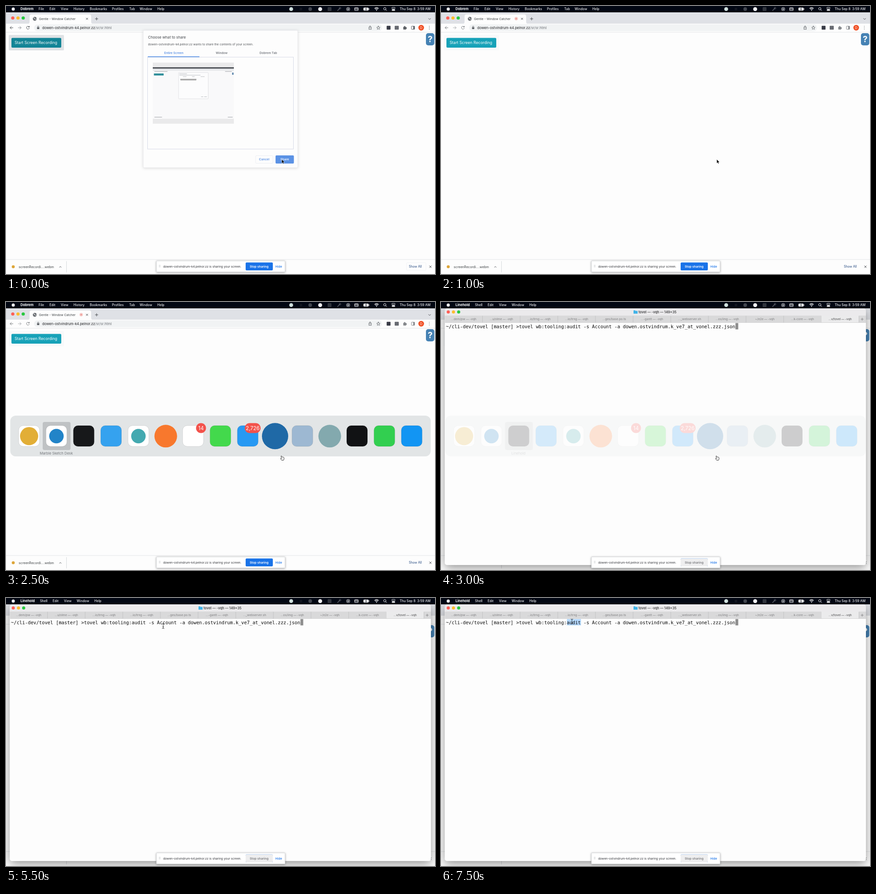
An HTML page for the animation above (8000 ms loop, 947 by 592 pixels).

```html
<!DOCTYPE html>
<html lang="en">
<head>
<meta charset="utf-8">
<title>Sharing demo</title>
<style>
html, body { margin: 0; width: 100%; height: 100%; overflow: hidden; background: #fdfdfd; }
svg { display: block; width: 947px; height: 592px; font-family: Inter, Roboto, sans-serif; }
text { white-space: pre; }
.mono { font-family: "DejaVu Sans Mono", "Liberation Mono", monospace; }
.line { fill: none; stroke-linecap: round; stroke-linejoin: round; }
.anim { animation: 8s step-end infinite; }

.dialog { animation-name: dialog; }
.focused { animation-name: focused; }
.idle { animation-name: idle; }
.nav { animation-name: nav; }
.rec { animation-name: rec; }
.late { animation-name: late; }
.early { animation-name: early; }
.switcher { animation-name: switcher; }
.selected { animation-name: selected; }
.arrow { animation-name: arrow; }
.hand { animation-name: hand; }
.beam { animation-name: beam; }
.mark { animation-name: mark; }

@keyframes dialog { 0% { opacity: 1 } 6.25%, 100% { opacity: 0 } }
@keyframes focused { 0% { opacity: 1 } 12.5%, 100% { opacity: 0 } }
@keyframes idle { 0% { opacity: 0 } 12.5%, 100% { opacity: 1 } }
@keyframes nav { 0% { opacity: 1 } 6.25% { opacity: .4 } 12.5%, 100% { opacity: .75 } }
@keyframes rec { 0% { opacity: 0 } 12.5% { opacity: .5 } 18.75% { opacity: .75 } 25% { opacity: 1 } 31.25%, 100% { opacity: .5 } }
@keyframes early { 0% { opacity: 1 } 37.5%, 100% { opacity: 0 } }
@keyframes late { 0% { opacity: 0 } 37.5%, 100% { opacity: 1 } }
@keyframes switcher { 0% { opacity: 0 } 31.25% { opacity: 1 } 37.5% { opacity: .2 } 43.75%, 100% { opacity: 0 } }
@keyframes selected { 0% { transform: none } 37.5%, 100% { transform: translateX(60.3px) } }
@keyframes arrow { 0% { opacity: 1 } 31.25%, 100% { opacity: 0 } }
@keyframes hand { 0% { opacity: 0 } 31.25% { opacity: 1 } 43.75%, 100% { opacity: 0 } }
@keyframes beam {
  0% { opacity: 0; transform: translate(608px, 339px) }
  43.75% { opacity: 1; transform: translate(608px, 339px) }
  56.25% { opacity: 1; transform: translate(582px, 331px) }
  62.5% { opacity: 1; transform: translate(470px, 371px) }
  68.75% { opacity: 1; transform: translate(347px, 62px) }
  75% { opacity: 1; transform: translate(300px, 61px) }
  81.25% { opacity: 1; transform: translate(187px, 56px) }
  87.5% { opacity: 1; transform: translate(240px, 56px) }
  93.75%, 100% { opacity: 1; transform: translate(289px, 52px) }
}
@keyframes mark { 0% { opacity: 0 } 93.75%, 100% { opacity: 1 } }
</style>
</head>
<body>
<svg id="stage" viewBox="0 0 947 592"></svg>
<script>
const host = 'dowen-ostvindrum-k4.pelnor.zz';
const bg = '#fdfdfd', blue = '#1a73e8', ink = '#3c4043';

const text = (x, y, size, fill, str, more = '') =>
  `<text x="${x}" y="${y}" font-size="${size}" fill="${fill}" ${more}>${str}</text>`;
const rect = (x, y, w, h, fill, r = 0, more = '') =>
  `<rect x="${x}" y="${y}" width="${w}" height="${h}" fill="${fill}" rx="${r}" ${more}/>`;
const circle = (x, y, r, fill, more = '') => `<circle cx="${x}" cy="${y}" r="${r}" fill="${fill}" ${more}/>`;
const path = (d, stroke, width = 1) => `<path class="line" d="${d}" stroke="${stroke}" stroke-width="${width}"/>`;
const group = (cls, ...parts) => `<g class="${cls}">${parts.join('')}</g>`;
const mid = 'text-anchor="middle"', bold = 'font-weight="600"', semi = 'font-weight="500"';
const midBold = `${mid} ${bold}`;
const lights = (xs, y, r) => xs.map((x, i) => circle(x, y, r, ['#fe5f57', '#febc2e', '#28c840'][i])).join('');

function menus(app, items) {
  return text(32, 9.4, 7.5, '#fff', app, 'font-weight="700"') +
    items.map(([x, label]) => text(x, 9.4, 7.1, '#f1f1f3', label, semi)).join('');
}

function menuBar() {
  const w = '#f0f0f2';
  return rect(0, 0, 947, 14, '#020713') + circle(16, 6.8, 3.5, w) +
    group('anim early', menus('Dobrem', [[72, 'File'], [96, 'Edit'], [121, 'View'], [149, 'History'],
      [185, 'Bookmarks'], [234, 'Profiles'], [272, 'Tab'], [295, 'Window'], [334, 'Help']])) +
    group('anim late', menus('Linehold', [[75, 'Shell'], [103, 'Edit'], [128, 'View'], [156, 'Window'], [195, 'Help']])) +
    circle(629.5, 6.8, 4.3, '#cfe0dd') + circle(651, 6.8, 3, '#11151f') + circle(671.5, 6.8, 4, '#42464f') +
    circle(693.5, 6.8, 4.4, w) + rect(710, 2.5, 8.5, 8.5, '#30343d', 1.5) +
    path('M732 10 L736.5 5.5', '#6a6d75', 1.2) + circle(737.3, 4.8, 1.8, 'none', 'stroke="#6a6d75"') +
    circle(755.3, 6.8, 3.6, 'none', `stroke="${w}"`) + circle(755.3, 6.8, 1.6, w) +
    rect(769.5, 3.5, 8, 6.5, 'none', 1, `stroke="${w}"`) + path('M770 5.5 h7 M771 7.7 h2 M774.5 7.7 h2', w) +
    rect(789, 3.5, 11.5, 6.5, w, 1.8) + rect(801, 5.5, 1, 2.5, w) + path('M795.5 4.5 l-2 2.5 h2.5 l-1.5 2.3', '#020713', .9) +
    path('M813.8 5.2 Q818 1.8 822.2 5.2 M815.4 7.1 Q818 5 820.6 7.1', w, 1.3) + circle(818, 9.2, 1.1, w) +
    circle(836.2, 6, 2.6, 'none', `stroke="${w}"`) + path('M838.2 8 l2.2 2.2', w) +
    rect(851.5, 3, 7.5, 3, 'none', 1.5, `stroke="${w}" stroke-width=".9"`) + rect(851.5, 7.2, 7.5, 3.2, w, 1.6) +
    text(869, 9.4, 7.2, w, 'Thu Sep 8  3:59 AM', semi);
}

function toolbar() {
  const g = '#5f6368';
  return rect(0, 14, 947, 26, '#dfe1e6') + lights([15, 26.5, 38], 26.5, 3.6) +
    `<path d="M48 39.5 Q52 39 52 35 V23 Q52 18.5 56.5 18.5 H183.5 Q188 18.5 188 23 V35 Q188 39 192 39.5Z" fill="${bg}"/>` +
    rect(0, 39, 947, 18.5, bg) + rect(0, 57.5, 947, 1, '#e3e5e8') +
    circle(63.5, 28.3, 4.2, g) + path('M61 26 l2.5 1 -1 2 M65 30 l1.5 -2', bg, 1.1) +
    text(73, 30.6, 6.75, ink, 'Gentle - Window Catcher') +
    group('anim rec', circle(166, 28, 3.2, 'none', 'stroke="#e0352b" stroke-width=".8"'), circle(166, 28, 2, '#e0352b')) +
    path('M177 26.5 l3.6 3.6 m0 -3.6 l-3.6 3.6 M200 25.3 v6 m-3 -3 h6 M932.8 27.5 l2.3 2.3 2.3 -2.3', '#45484d') +
    group('anim nav',
      path('M15.5 48 h-6.5 m3 -3 l-3 3 3 3', '#4c5055'), path('M27 48 h6.5 m-3 -3 l3 3 -3 3', '#8b8f94'),
      path('M51 46 A3.2 3.2 0 1 0 51.5 49 M51.5 44.5 v2 h-2', '#4c5055')) +
    rect(62, 40.5, 768, 15, '#f1f3f4', 7.5) +
    rect(68.5, 47, 5, 4, g, .7) + path('M69.5 47 v-1 a1.5 1.5 0 0 1 3 0 v1', g, .9) +
    text(80, 50.7, 7.7, '#202124', `${host}<tspan fill="#6b6f74">/sr/sr.html</tspan>`) +
    path('M802 46.5 h-1 v5 h5.5 v-5 h-1 M803.7 49.5 v-5.5 m-1.6 1.5 l1.6 -1.6 1.6 1.6', g, .9) +
    path('M822 44.2 l1.1 2.5 2.7 .3 -2 1.8 .6 2.7 -2.4 -1.4 -2.4 1.4 .6 -2.7 -2 -1.8 2.7 -.3Z', g, .9) +
    rect(840.3, 43.8, 8.5, 8.5, '#383b46', 1) + rect(858, 43.8, 9, 8.5, '#686b72', 1) +
    group('anim nav',
      rect(877, 46, 6.5, 6, g, .8), circle(880, 45.6, 1.4, g), circle(883.7, 48.8, 1.3, g),
      rect(895, 44.5, 7, 7, 'none', .7, `stroke="${g}"`), rect(899, 44.5, 3, 7, g),
      [44.8, 48, 51.2].map(y => circle(934.5, y, .8, g)).join('')) +
    circle(916.5, 48, 6.2, '#f04e23') + text(916.5, 50.5, 7, '#fff', 'D', mid);
}

function page() {
  const label = text(19, 84.4, 8.6, '#fff', 'Start Screen Recording');
  return rect(0, 58, 947, 534, bg) +
    group('anim idle', rect(6, 64, 122, 34, '#f8f9fa', 2), rect(12, 70.5, 110, 21.5, '#17a2b8', 2.2), label) +
    group('anim focused', rect(6, 64, 122, 34, '#dfe2e5', 2), rect(12, 70.5, 110, 21.5, '#138496', 2.2), label) +
    rect(927, 60, 18.5, 27, '#4682b4', 5) +
    text(936.3, 80, 19, '#fff', '?', `${mid} font-weight="700"`);
}

function downloads() {
  return rect(0, 559.5, 947, 1, '#e4e5e8') + circle(16, 576, 3.3, '#dda63a') +
    text(28, 578.8, 7.2, ink, 'screenRecordi....webm') +
    path('M118 577.3 l2 -2 2 2', '#50545a') + rect(133, 563.5, 1, 25, '#d6d9dd') +
    group('anim focused', rect(884, 567, 43, 17, 'none', 2, 'stroke="#f1f2f5"')) +
    text(903.5, 578.2, 6.9, '#456493', 'Show All', `${mid} ${semi}`) +
    path('M934.8 573.8 l4.2 4.2 m0 -4.2 l-4.2 4.2', '#45484d');
}

function preview() {
  return rect(324, 125, 179, 135, '#eaeaeb') + rect(324, 135.5, 179, 3, '#383c43') +
    rect(324, 138.5, 179, 110.5, '#f9f9fa') + rect(324, 138.5, 179, 4, '#e3e5e8') +
    path('M328 144.7 h28 M484 144.7 h14 M328 245.5 h16 M490 245.5 h10', '#92969b', .9) +
    rect(326.5, 149, 21.5, 4.5, '#308f9a', .5) + rect(499, 147, 3.5, 5, '#6990b2', 1) +
    rect(381, 147, 65.5, 58, '#fcfcfd', 1, 'stroke="#e0e1e4"') +
    path('M383 149.8 h16 M383 152.8 h46 M391 156 h7 M411 156 h5 M430 156 h8 M431 200.5 h4 M438 200.5 h5', '#a9acb2', .8) +
    rect(385, 161, 35, 4, '#c9c9c9') + path('M385 162 h35', '#555', .8);
}

function dialog() {
  const soft = '#5b92e5';
  const tab = (x, fill, label) => text(x, 106.4, 6.6, fill, label, midBold);
  return group('anim dialog',
    rect(303, 54, 341, 303, bg, 2, 'filter="url(#soft)" stroke="#e9e9ec"'),
    text(313.5, 71.9, 8.1, '#414449', 'Choose what to share'),
    text(313.5, 87.4, 6.48, '#505357', `${host} wants to share the contents of your screen.`),
    tab(370.5, soft, 'Entire Screen'), tab(476, '#767a80', 'Window'), tab(579, '#767a80', 'Dobrem Tab'),
    rect(312.5, 113, 322, 203, 'none', 0, 'stroke="#d6d9e6"'), rect(313, 111.3, 114, 1.7, soft),
    preview(),
    rect(551, 330.5, 38, 17, bg, 2, 'stroke="#eceef3"'), text(570, 341.3, 6.8, soft, 'Cancel', midBold),
    rect(595, 330, 40.5, 18, soft, 2), text(615.2, 341.3, 6.8, '#f4f8ff', 'Share', midBold));
}

function shellWindow() {
  const tabs = ['...dem/pw — -vqh', '...u/olme — -vqh', '...io/trng — -vqh', '...io/trng — -vqh', '...ges/base.po.ts',
    '...-gantt — -vqh', '..._webserver.sh', '...os/img — -vqh', '~/e2e — -vqh', '...k-core — -vqh', '...v/tovel — -vqh'];
  const step = 83.1;
  const bar = tabs.map((name, i) => {
    const x = 8.5 + i * step, active = i === tabs.length - 1;
    return (active ? rect(x, 30, step, 15.5, '#ebebec') : '') + rect(x + step - .5, 30.5, 1, 15, '#c4c4c5') +
      text(x + step / 2, 40.3, 6.5, active ? '#5c5c5e' : '#8b8b8d', name, `${mid} ${semi}`);
  }).join('');
  return group('anim late',
    rect(8.5, 14.5, 929.5, 566.5, bg, 5, 'filter="url(#deep)"'),
    `<path d="M8.5 30 V20 Q8.5 14.5 14 14.5 H932.5 Q938 14.5 938 20 V30Z" fill="#ebeaec"/>`,
    rect(8.5, 30, 929.5, 15.5, '#d9d9da'), bar, rect(8.5, 45.2, 929.5, .6, '#c4c4c5'),
    path('M927 38 h5.5 m-2.75 -2.75 v5.5', '#77777a', .8),
    lights([16, 27.5, 39], 22, 3.5),
    `<path d="M425 18.5 h3.5 l1 1.2 h4.5 v6 h-9Z" fill="#3fb3e8"/>`,
    text(436, 24.6, 7.45, '#444446', 'tovel — -vqh — 149×35', bold),
    group('anim mark', rect(278, 46.5, 31, 14, '#b4d8fd')),
    rect(650, 46.5, 6.2, 14, '#8f8f8f'),
    text(11, 57.6, 10.3, '#0c0c0c',
      '~/cli-dev/tovel [master] &gt;tovel wb:tooling:audit -s Account -a dowen.ostvindrum.k_ve7_at_vonel.zzz.json', 'class="mono"'));
}

function switcher() {
  // Tile colour (or null), then an optional dot colour and radius.
  const icons = [['#fff', '#e2ae36', 20], ['#fff', '#2284c8', 16], ['#17181a'], ['#35a2ef'], ['#fff', '#43a9b0', 16],
    [null, '#f8782d', 25], ['#fff'], ['#43d94c'], ['#2799f3'], [null, '#1f69a6', 29],
    ['#9db8d2'], [null, '#83a9ae', 25], ['#111214'], ['#32cf50'], ['#1295f3']];
  const tiles = icons.map(([tile, dot, r], i) => {
    const x = 51 + i * 60.33;
    return (tile ? rect(x - 23, 273, 46, 46, tile, 10, 'stroke="#000" stroke-opacity=".1"') : '') +
      (dot ? circle(x, 296.3, r, dot) : '');
  }).join('');
  const badge = (x, w, n) => rect(x - w / 2, 267.5, w, 22, '#f3524b', 11) + text(x, 282.7, 11.3, '#fff', n, mid);
  const name = (x, label) => text(x, 337.2, 7.7, '#73777b', label, mid);
  return group('anim switcher',
    rect(9.5, 251, 928, 90, '#e2e5e6', 12),
    group('anim selected', rect(81, 265, 61.5, 62, '#bfc2c4', 4)),
    tiles, badge(430.5, 22, '14'), badge(544.5, 35, '2,726'),
    group('anim early', name(111, 'Marble Sketch Desk')), group('anim late', name(171, 'Linehold')));
}

function shareBar() {
  const stop = fill => text(558.7, 577.6, 6.8, fill, 'Stop sharing', midBold);
  return rect(332, 563, 284, 24.5, '#fff', 1, 'filter="url(#near)" stroke="#c5c7ca" stroke-width=".8"') +
    [572.5, 574.5, 576.5].map(y => circle(338.2, y, .5, '#92969b') + circle(340.2, y, .5, '#92969b')).join('') +
    text(347, 577.5, 6.6, '#303237', `${host} is sharing your screen.`) +
    rect(529, 566.5, 60, 17.5, blue, 2) + stop('#fff') +
    group('anim late', rect(529, 566.5, 60, 17.5, '#eeeeef', 2), stop('#7c7d80')) +
    text(602, 577.6, 6.8, blue, 'Hide', `${mid} ${semi}`);
}

function pointers() {
  return group('anim arrow', '<path d="M608.7 338.8 v8.7 l2 -1.8 1.3 3 1.5 -.7 -1.3 -2.9 h2.7Z" fill="#000" stroke="#fff" stroke-width=".6"/>') +
    group('anim hand', '<path d="M607 340.5 q1 -1 1.7 0 l1.3 2.2 q3.2 -.7 3.7 1.5 v3 l-1 2.3 h-4.2 l-2.5 -3.5 q0 -1.2 2.2 -.4Z" fill="#fff" stroke="#222" stroke-width=".9"/>') +
    group('anim beam', path('M-2 -5.5 Q0 -5.5 0 -4 Q0 -5.5 2 -5.5 M0 -4 V4 M-2 5.5 Q0 5.5 0 4 Q0 5.5 2 5.5 M-1 1.5 H1', '#222', .9));
}

const shadow = (id, blur, dy, alpha) =>
  `<filter id="${id}" x="-20%" y="-40%" width="140%" height="180%"><feDropShadow dx="0" dy="${dy}" stdDeviation="${blur}" flood-opacity="${alpha}"/></filter>`;

document.getElementById('stage').innerHTML =
  `<defs>${shadow('soft', 3, 1, .14)}${shadow('near', 2, 1, .35)}${shadow('deep', 11, 6, .42)}</defs>` +
  page() + toolbar() + downloads() + dialog() + shellWindow() + switcher() + shareBar() + menuBar() + pointers();
</script>
</body>
</html>
```
